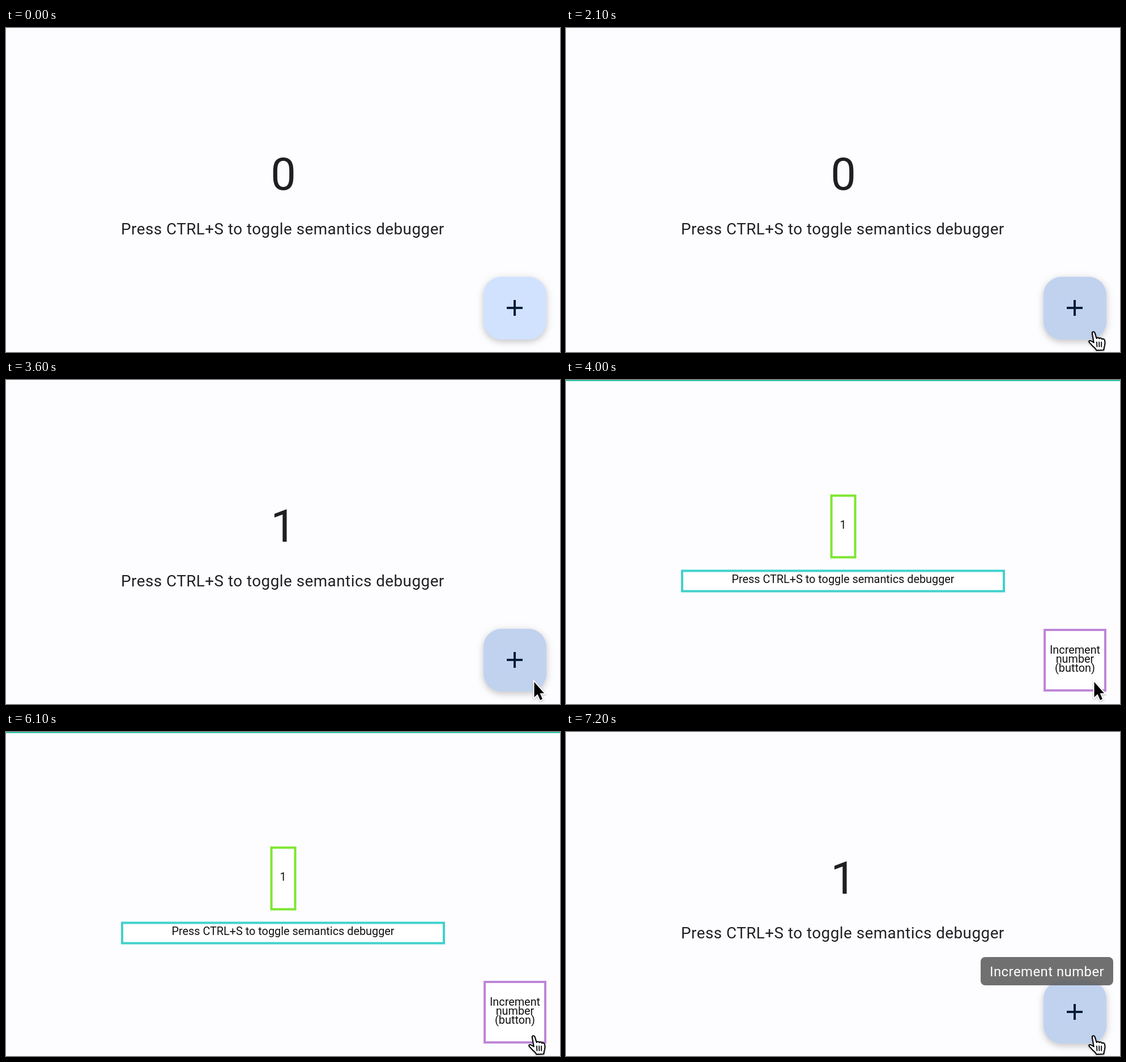
Animation, 978 px wide and 573 px high, one loop 7.3 s. Source, as an HTML page:

```html
<!DOCTYPE html>
<html lang="en">
<head>
<meta charset="utf-8">
<title>Counter with semantics debugger</title>
<style>
  html, body { margin: 0; width: 100%; height: 100%; overflow: hidden; background: #fdfdff; }
  .stage { position: relative; width: 978px; height: 573px; overflow: hidden; font-family: Roboto, sans-serif; }
  .layer { position: absolute; left: 0; top: 0; width: 978px; height: 573px; }

  /* Everything shares one 7.3 s clock and changes ten times a second. */
  .t { animation: 7.3s step-end infinite; }

  .app { animation-name: app; }
  .debug { animation-name: debug; }
  .zero { animation-name: zero; }
  .one { animation-name: one; }
  .number { font-size: 79.4px; fill: #1f1f22; }
  .hint { font-size: 27.79px; letter-spacing: .496px; fill: #1f2023; }

  .fab {
    position: absolute; left: 842.8px; top: 439.8px; width: 111.4px; height: 111.4px;
    border-radius: 32px; overflow: hidden; background: #d1e2ff;
    box-shadow: 0 4px 11px rgba(0,0,0,.17), 0 2px 18px rgba(0,0,0,.08);
  }
  .hover, .ripple { position: absolute; background: #001d36; }
  .hover { inset: 0; opacity: 0; animation-name: hover; }
  .ripple {
    left: -62px; top: -52px; width: 300px; height: 300px;
    border-radius: 50%; opacity: 0; animation-name: ripple;
  }
  .plus { position: absolute; left: 41.7px; top: 41.7px; width: 28px; height: 28px; }

  .tooltip {
    position: absolute; left: 731.5px; top: 398px; width: 234.5px; height: 49.5px;
    border-radius: 8px; background: rgba(97,97,97,.9); opacity: 0; animation-name: tooltip;
  }
  .tooltip text { font-size: 23.82px; letter-spacing: .496px; fill: #fff; }

  .box { stroke-width: 4; fill: #fff; }
  .label { font-size: 19.85px; text-anchor: middle; fill: #111; }

  .cursor { animation-name: move; }
  .arrow { animation-name: arrow; }
  .hand { animation-name: hand; }
  .cursor { filter: drop-shadow(0 1px 1.5px rgba(0,0,0,.3)); }

  @keyframes app { 0%, 84.93% { visibility: visible } 54.79% { visibility: hidden } }
  @keyframes debug { 0%, 84.93% { visibility: hidden } 54.79% { visibility: visible } }
  @keyframes zero { 0% { opacity: 1 } 30.13%, 100% { opacity: 0 } }
  @keyframes one { 0% { opacity: 0 } 30.13%, 100% { opacity: 1 } }

  @keyframes hover {
    0%, 84.93% { opacity: 0 }
    13.69%, 86.3% { opacity: .05 }
    15.06%, 87.67%, 100% { opacity: .08 }
  }
  @keyframes tooltip {
    0%, 28.76% { opacity: 0 }
    13.69% { opacity: .25 }
    15.06% { opacity: .8 }
    16.43% { opacity: 1 }
    86.3% { opacity: .25 }
    87.67% { opacity: .8 }
    89.04%, 100% { opacity: 1 }
  }
  @keyframes ripple {
    0%, 38.35%, 100% { opacity: 0; transform: scale(1) }
    30.13% { opacity: .08; transform: scale(.35) }
    31.5% { opacity: .1; transform: scale(.65) }
    32.87% { opacity: .1; transform: scale(.9) }
    34.24% { opacity: .08; transform: scale(1) }
    35.61% { opacity: .05; transform: scale(1) }
    36.98% { opacity: .02; transform: scale(1) }
  }

  @keyframes move {
    0% { transform: translate(990px, 590px) }
    12.32% { transform: translate(955px, 556px) }
    13.69% { transform: translate(948px, 550px) }
    15.06% { transform: translate(945px, 548px) }
    16.43% { transform: translate(943px, 547px) }
    17.8% { transform: translate(940px, 545px) }
    19.17% { transform: translate(936px, 541px) }
    20.54% { transform: translate(933px, 539px) }
    21.91%, 100% { transform: translate(931px, 537px) }
  }
  @keyframes arrow {
    0%, 49.31% { visibility: visible }
    13.69%, 83.56%, 100% { visibility: hidden }
  }
  @keyframes hand {
    0%, 49.31% { visibility: hidden }
    13.69%, 83.56%, 100% { visibility: visible }
  }
</style>
</head>
<body>
<div class="stage">
  <div class="layer app t">
    <svg class="layer">
      <text class="number zero t" x="467.2" y="286">0</text>
      <text class="number one t" x="467.2" y="286">1</text>
      <text class="hint" x="203" y="365">Press CTRL+S to toggle semantics debugger</text>
    </svg>
    <div class="fab">
      <div class="hover t"></div>
      <div class="ripple t"></div>
      <svg class="plus"><path d="M0 14H28M14 0V28" stroke="#001d36" stroke-width="4"/></svg>
    </div>
    <div class="tooltip t">
      <svg width="234" height="49"><text x="16" y="34">Increment number</text></svg>
    </div>
  </div>

  <svg class="layer debug t">
    <path d="M0 1H978" stroke="#2cc5a8" stroke-width="2"/>
    <rect class="box" x="468.5" y="204.5" width="42" height="109" stroke="#7de62f"/>
    <rect class="box" x="205" y="337.5" width="568" height="36" stroke="#41d1cc"/>
    <rect class="box" x="845" y="442" width="107" height="107" stroke="#bf86d8"/>
    <g class="label">
      <text x="489" y="263">1</text>
      <text x="489" y="359">Press CTRL+S to toggle semantics debugger</text>
      <text x="898.5" y="484">Increment</text>
      <text x="898.5" y="500">number</text>
      <text x="898.5" y="516">(button)</text>
    </g>
  </svg>

  <svg class="layer">
    <g class="cursor t">
      <path class="arrow t" d="M1.5-3V24L7.5 18.5 12 29 16 27.3 11.6 17H19Z"
            fill="#000" stroke="#fff" stroke-width="4" paint-order="stroke"/>
      <g class="hand t" stroke="#000" stroke-linecap="round" stroke-linejoin="round">
        <path d="M-2 3.5C-3-.2 1.6-1 2.6 2.3L5.6 12C6.5 9.8 9.7 9.9 10.3 12.3 11.7 10.7 14.6 11.1 15.1 13.4
                 16.6 12.2 19.4 13 19.9 15.4 21 20 20.9 22 19.4 26L18.2 32.5 5.4 33
                 C4.8 30-1.5 26-4 22.5-5.8 20-9 18.6-7.5 16.6-5.5 15-2.4 17 .8 19.5Z"
              fill="#fff" stroke-width="2"/>
        <path d="M6 18.5 6.4 26.5M10.2 18.5 10.4 26.5M14.2 18.5V26.5" fill="none" stroke-width="1.8"/>
      </g>
    </g>
  </svg>
</div>
</body>
</html>
```
